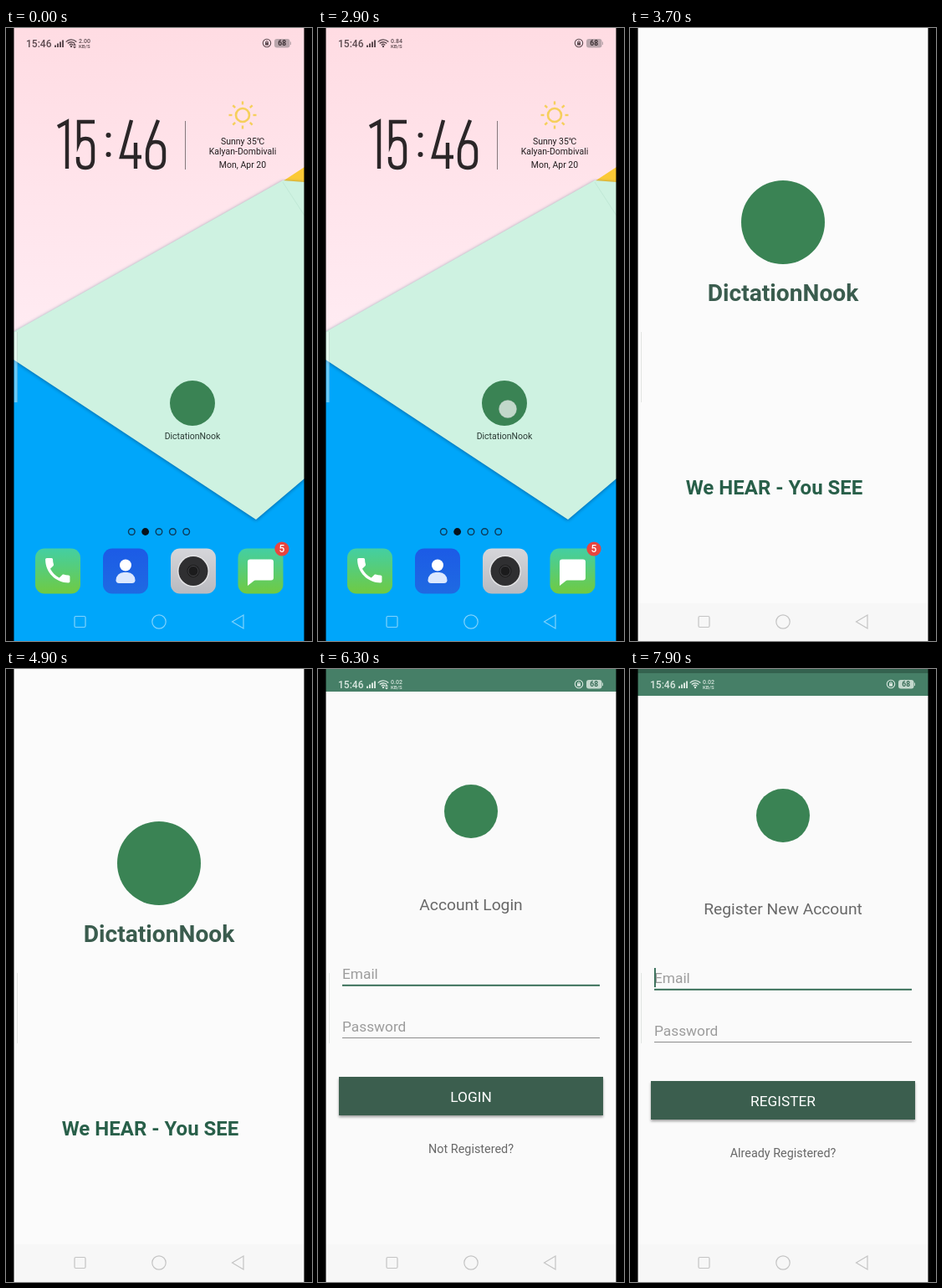
Recreate the animation shown at these times as an HTML page with a canvas. Size 366x732 px, loop 8000 ms.

```html
<!DOCTYPE html>
<html lang="en">
<head>
<meta charset="utf-8">
<title>DictationNook</title>
<style>
html, body { margin: 0; width: 100%; height: 100%; overflow: hidden; background: #000; }
canvas { display: block; }
</style>
</head>
<body>
<canvas id="stage" width="366" height="732"></canvas>
<script>
const W = 366, H = 732, LOOP = 8000;
const LEFT = 9.5, RIGHT = 356.5;
const APP = 'DictationNook';
const GREEN = '#3a8354', DARK = '#3b5e4e', PAPER = '#fafafa';
const HANDSET = new Path2D('M6.62 10.79c1.44 2.83 3.76 5.14 6.59 6.59l2.2-2.2c.27-.27.67-.36 1.02-.24 1.12.37 2.33.57 3.57.57.55 0 1 .45 1 1V20c0 .55-.45 1-1 1-9.39 0-17-7.61-17-17 0-.55.45-1 1-1h3.5c.55 0 1 .45 1 1 0 1.25.2 2.45.57 3.57.11.35.03.74-.25 1.02z');
const DIGITS = new Path2D(
  'M62 118L73 112V168' +
  'M106 112H87V137Q89 132 95 132Q104 132 104 143V157Q104 167 95 167Q86 167 86 157V154' +
  'M150 110L138 154H162M155 137V168' +
  'M182 110L171 139Q169 144 169 150V156Q169 167 179 167Q189 167 189 156V147Q189 136 179 136Q172 136 170 143');

const main = document.getElementById('stage').getContext('2d');
const sheet = document.createElement('canvas');
sheet.width = W;
sheet.height = H;
const layer = sheet.getContext('2d');
let c = main;

function rect(x, y, w, h, color) {
  c.fillStyle = color;
  c.fillRect(x, y, w, h);
}

function disc(x, y, r, color) {
  c.beginPath();
  c.arc(x, y, r, 0, Math.PI * 2);
  c.fillStyle = color;
  c.fill();
}

function ring(x, y, r, color, width) {
  c.beginPath();
  c.arc(x, y, r, 0, Math.PI * 2);
  c.strokeStyle = color;
  c.lineWidth = width;
  c.stroke();
}

function round(x, y, w, h, r, color) {
  c.beginPath();
  c.roundRect(x, y, w, h, r);
  c.fillStyle = color;
  c.fill();
}

function trace(points) {
  c.beginPath();
  points.forEach(([x, y]) => c.lineTo(x, y));
}

function poly(points, color) {
  trace(points);
  c.closePath();
  c.fillStyle = color;
  c.fill();
}

function line(points, color, width) {
  trace(points);
  c.strokeStyle = color;
  c.lineWidth = width;
  c.stroke();
}

function fade(y0, y1, top, bottom) {
  const g = c.createLinearGradient(0, y0, 0, y1);
  g.addColorStop(0, top);
  g.addColorStop(1, bottom);
  return g;
}

function text(s, x, y, size, color, align = 'center', weight = 400) {
  c.font = `${weight} ${size}px Roboto, "Noto Sans", "Noto Sans CJK SC", sans-serif`;
  c.textAlign = align;
  c.fillStyle = color;
  c.fillText(s, x, y);
}

function wallpaper() {
  rect(0, 0, W, H, fade(0, 360, '#ffdce3', '#ffebf2'));
  rect(0, 390, W, 342, '#00a6fa');
  poly([[331, 183], [357, 166], [357, 186]], '#fbc935');
  c.save();
  c.shadowColor = 'rgba(0,40,80,.5)';
  c.shadowBlur = 4;
  c.shadowOffsetY = 1;
  poly([[9, 363], [331, 182], [357, 184], [357, 538], [299, 587], [9, 396]], '#cef2e1');
  c.restore();
  line([[331, 184], [357, 224]], '#c0e8d6', 1);
}

function clock() {
  c.strokeStyle = '#2b2628';
  c.lineWidth = 4.4;
  c.stroke(DIGITS);
  disc(122.5, 128, 3, '#2b2628');
  disc(122.5, 151, 3, '#2b2628');
  rect(214, 111, 1, 58, '#85787c');
}

function weather() {
  ring(283, 104, 8, '#f6cf5c', 2.6);
  for (let i = 0; i < 8; i++) {
    const a = i * Math.PI / 4, x = Math.cos(a), y = Math.sin(a);
    line([[283 + x * 12.5, 104 + y * 12.5], [283 + x * 16.5, 104 + y * 16.5]], '#f6cf5c', 2.4);
  }
  text('Sunny 35℃', 283, 139, 10.5, '#241e20');
  text('Kalyan-Dombivali', 283, 151, 10.5, '#241e20');
  text('Mon, Apr 20', 283, 167, 10.5, '#241e20');
}

function dock() {
  const y = 621.5, s = 54;
  const leaf = fade(y, y + s, '#43cfa3', '#70ca42');
  round(35, y, s, s, 11, leaf);
  c.save();
  c.translate(42.2, 628.2);
  c.scale(1.63, 1.63);
  c.fillStyle = '#fff';
  c.fill(HANDSET);
  c.restore();

  round(116, y, s, s, 11, fade(y, y + s, '#1c5be6', '#1f6ae2'));
  disc(143, 641.5, 7, '#fff');
  round(131.5, 650, 23, 13, [10, 10, 4, 4], '#dbe8ff');

  round(197, y, s, s, 11, fade(y, y + s, '#d6d6da', '#b9babf'));
  disc(224, 648.5, 19, '#e4e4e6');
  disc(224, 648.5, 17.5, '#2f2f31');
  disc(224, 648.5, 7.5, '#1b1b1c');
  ring(224, 648.5, 6, '#454548', 1);

  round(277.5, y, s, s, 11, leaf);
  round(289, 634.5, 31, 25, 3, '#fff');
  poly([[289, 655], [298, 659], [289, 666]], '#fff');
  disc(330, 622, 8.6, '#e8453f');
  text('5', 330, 626.2, 12, '#fff', 'center', 500);
}

function home() {
  clock();
  weather();
  disc(223, 448, 27, GREEN);
  text(APP, 223, 490.5, 10.5, '#2a3a34');
  for (let i = 0; i < 5; i++) {
    const x = 150.3 + i * 16.35;
    if (i === 1) disc(x, 601.5, 4.4, '#07131c');
    else ring(x, 601.5, 3.8, '#0d3a58', 1.4);
  }
  dock();
}

function navBar(color, back) {
  if (back) rect(LEFT, 687, RIGHT - LEFT, 45, back);
  c.beginPath();
  c.roundRect(82, 702.5, 13, 13, 1.5);
  c.strokeStyle = color;
  c.lineWidth = 1.2;
  c.stroke();
  ring(183, 709, 8.2, color, 1.2);
  trace([[270.5, 709], [284, 701], [284, 717]]);
  c.closePath();
  c.stroke();
}

function statusBar(t, ink, cell) {
  const busy = t < 1600 || (t >= 6300 && t < 7000);
  const speed = t < 1600 ? '2.00' : t < 6300 ? '0.84' : '0.02';
  text('15:46', 24, 22.8, 12, ink, 'left', 500);
  for (let i = 0; i < 4; i++) rect(58 + i * 3, 20.5 - i * 2, 2, 2.5 + i * 2, ink);
  c.strokeStyle = ink;
  c.lineWidth = 1.4;
  for (const r of [3, 5.8, 8.6]) {
    c.beginPath();
    c.arc(78, 22.5, r, -Math.PI * .76, -Math.PI * .24);
    c.stroke();
  }
  disc(78, 22, 1.2, ink);
  if (busy) {
    poly([[80, 21], [84, 21], [82, 18.5]], ink);
    poly([[80, 22], [84, 22], [82, 24.5]], ink);
  }
  text(speed, 87, 17.6, 7, ink, 'left', 500);
  text('KB/S', 87, 24, 6, ink, 'left', 500);
  ring(312, 18, 4.7, ink, 1.1);
  rect(310, 17.4, 4, 3.2, ink);
  ring(312, 17, 1.4, ink, .9);
  round(321, 13, 18.5, 10.5, 3, cell);
  rect(340, 16.5, 1, 3.5, cell);
  text('68', 330.2, 21.4, 8.5, ink === '#5d4b51' ? '#3c3034' : '#376a55', 'center', 700);
}

function splash() {
  rect(0, 0, W, H, '#fbfbfb');
  disc(183, 232, 50, GREEN);
  text(APP, 183, 325.5, 28.2, '#3a5c4e', 'center', 700);
  text('We HEAR - You SEE', 172.5, 557, 24, '#285f49', 'center', 700);
}

function form(p, caret, bar) {
  rect(0, 0, W, H, PAPER);
  if (bar > 0) {
    c.globalAlpha = bar;
    rect(0, 0, W, 27, '#467f67');
    c.globalAlpha = 1;
  }
  disc(183, 170, 32, GREEN);
  text(p.title, 183, 288, 19.25, '#686868');
  text('Email', 29, 370, 17.3, '#9c9c9c', 'left');
  text('Password', 29, 433, 17.3, '#9c9c9c', 'left');
  rect(29, 376.8, 308, 1.9, '#2f6851');
  rect(29, 440, 308, 1, '#8c8c8c');
  if (caret) rect(29, 352, 1.8, 23, '#2f6851');
  c.save();
  c.shadowColor = 'rgba(0,0,0,.38)';
  c.shadowBlur = 3;
  c.shadowOffsetY = 2;
  rect(25, 487, 316, 46, DARK);
  c.restore();
  text(p.button, 183, 516.6, 17.3, '#fff');
  text(p.hint, 183, 577.5, 14.4, '#686868');
}

const LOGIN = { title: 'Account Login', button: 'LOGIN', hint: 'Not Registered?' };
const REGISTER = { title: 'Register New Account', button: 'REGISTER', hint: 'Already Registered?' };

// A page fades in quickly while it glides up to rest.
function enter(page, dt, caret, bar) {
  const shift = 38 * Math.pow(1 - Math.min(1, dt / 640), 1.67);
  c = layer;
  form(page, caret, bar);
  c = main;
  c.globalAlpha = Math.min(1, dt / 170);
  c.drawImage(sheet, 0, shift);
  c.globalAlpha = 1;
}

function touch(x, y, alpha) {
  disc(x, y, 10.5, `rgba(240,244,242,${alpha})`);
  ring(x, y, 10.5, `rgba(190,200,195,${alpha * .5})`, 1);
}

function launchWindow(t) {
  const m = Math.pow(Math.max(0, (3200 - t) / 200), 2.4);
  const k = m / Math.pow(.5, 0) / Math.pow(1, 1);
  const x = LEFT + 24.5 * k, y = 52 * k;
  rect(x, y, RIGHT - 15.5 * k - x, H - 32 * k - y, PAPER);
}

function draw(t) {
  const caret = Math.floor(t / 500) % 2 === 1;
  const dark = '#5d4b51', pale = '#d7e6de';
  if (t < 3400) {
    wallpaper();
    if (t < 3000) {
      home();
      if (t >= 2900) touch(227, 455, .75);
    } else {
      launchWindow(t);
      if (t < 3100) ring(227, 455, 10.5, '#f2f2f2', 1);
    }
    statusBar(t, dark, '#b9a5ab');
    if (t < 3200) navBar('rgba(255,255,255,.5)');
    else navBar('#c6c6c6', '#f8f8f8');
  } else {
    const bar = Math.max(0, Math.min(1, (t - 5800) / 300));
    if (t < 6300) splash();
    if (t > 5650) enter(LOGIN, t - 5650, caret && t < 7500, bar);
    if (t >= 7200 && t < 7500) touch(197, 575, .6);
    if (t > 7450) {
      rect(0, 0, W, 27, '#34624f');
      enter(REGISTER, t - 7450, caret, 1);
    }
    if (bar > 0) {
      c.globalAlpha = bar;
      statusBar(t, pale, '#c3d8cd');
      c.globalAlpha = 1;
    }
    navBar('#c4c4c4', '#f7f7f7');
  }
  rect(LEFT, 363, 4, 84, 'rgba(255,255,255,.4)');
  rect(13, 363, .7, 84, 'rgba(150,160,155,.35)');
  rect(0, 0, LEFT, H, '#000');
  rect(RIGHT, 0, W - RIGHT, H, '#000');
}

const start = performance.now();
function tick() {
  const t = (performance.now() - start) % LOOP;
  draw(Math.floor(t / 100) * 100);
  requestAnimationFrame(tick);
}
tick();
</script>
</body>
</html>
```
